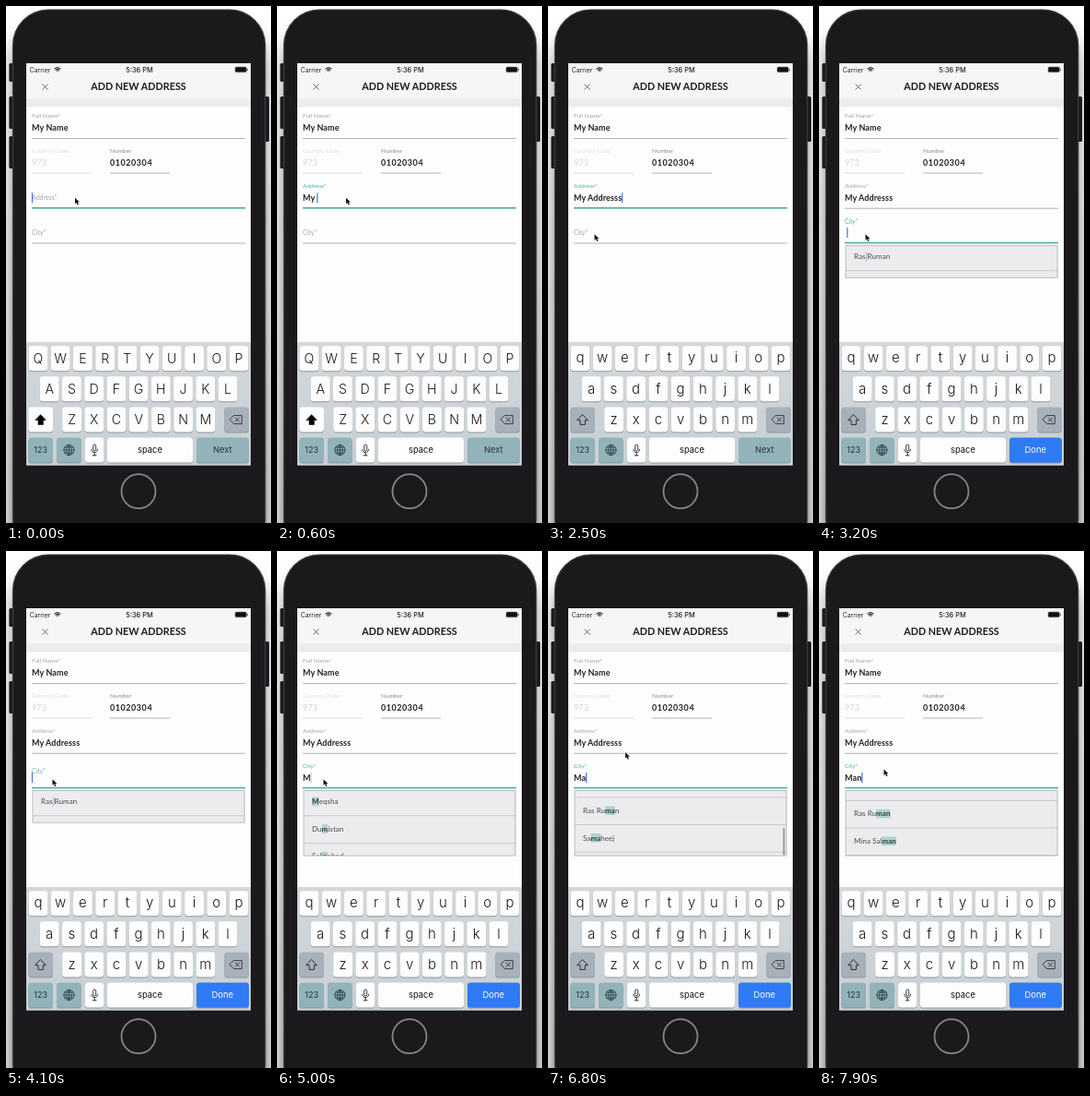
Animation, 288 px wide and 560 px high, one loop 8 s. Source, as an HTML page:

```html
<!DOCTYPE html>
<html lang="en">
<head>
<meta charset="utf-8">
<title>Add new address</title>
<style>
html, body { margin: 0; width: 100%; height: 100%; overflow: hidden; background: #fff; }
svg { display: block; width: 100%; height: 100%; }
text { white-space: pre; font-family: Lato, sans-serif; }
.ui { font-family: Inter, sans-serif; text-anchor: middle; }
</style>
</head>
<body>
<svg id="stage" viewBox="0 0 288 560">
  <defs>
    <filter id="soft" x="-20%" y="-10%" width="140%" height="120%"><feGaussianBlur stdDeviation="10"/></filter>
    <linearGradient id="shade" x1="0" y1="0" x2="0" y2="1">
      <stop offset="0" stop-opacity=".36"/><stop offset="1" stop-opacity=".68"/>
    </linearGradient>
    <linearGradient id="board" x1="0" y1="0" x2="0" y2="1">
      <stop offset="0" stop-color="#d3d7da"/><stop offset="1" stop-color="#c8d0d5"/>
    </linearGradient>
    <clipPath id="view"><rect id="viewBox" x="29" y="259" width="231" height="71"/></clipPath>
  </defs>
</svg>
<script>
const NS = 'http://www.w3.org/2000/svg';
const LOOP = 8000, ROW = 29.6, TOP = 259, MAX_H = 71;
const TEAL = [80, 176, 165], GREY = [165, 165, 165];
const stage = document.getElementById('stage');

function el(tag, attrs, parent = stage) {
  const node = document.createElementNS(NS, tag);
  set(node, attrs);
  parent.appendChild(node);
  return node;
}
function set(node, attrs) {
  for (const k in attrs) node.setAttribute(k, attrs[k]);
}
const rect = (x, y, width, height, fill, rx = 0, parent = stage) =>
  el('rect', { x, y, width, height, fill, rx }, parent);
const path = (d, attrs, parent = stage) =>
  el('path', { d, fill: 'none', 'stroke-linecap': 'round', 'stroke-linejoin': 'round', ...attrs }, parent);
function text(str, x, y, size, fill, attrs = {}, parent = stage) {
  const node = el('text', { x, y, 'font-size': size, fill, ...attrs }, parent);
  node.textContent = str;
  return node;
}
const group = (parent = stage, attrs = {}) => el('g', attrs, parent);
const show = (node, on) => node.setAttribute('display', on ? 'inline' : 'none');
const mix = (a, b, p) => `rgb(${a.map((v, i) => Math.round(v + (b[i] - v) * p))})`;

// Piecewise linear value; keys are [time, value]
function track(t, keys) {
  if (t <= keys[0][0]) return keys[0][1];
  for (let i = 1; i < keys.length; i++) {
    const [t1, v1] = keys[i], [t0, v0] = keys[i - 1];
    if (t < t1) return v0 + (v1 - v0) * (t - t0) / (t1 - t0);
  }
  return keys[keys.length - 1][1];
}
// Latest value of [time, value] steps
function step(t, keys) {
  let value = keys[0][1];
  for (const [at, v] of keys) if (t >= at) value = v;
  return value;
}

function drawPhone() {
  el('rect', { x: 6, y: 24, width: 277, height: 600, rx: 39, fill: 'url(#shade)', filter: 'url(#soft)' });
  [[3.4, 62, 20], [3.4, 98, 35], [3.4, 141, 35], [281, 98, 49]].forEach(([x, y, h]) => rect(x, y, 5, h, '#1b191c', 1.5));
  rect(6.9, 3.5, 275.4, 590, '#3c3a3e', 39);
  rect(8.2, 4.8, 272.8, 590, '#1b191c', 37.7);
  el('circle', { cx: 144, cy: 525.7, r: 18.5, fill: 'none', stroke: '#858488', 'stroke-width': 1.8 });
  rect(22, 62, 244, 435.4, '#fdfdfe');
}

function drawHeader() {
  rect(22, 62, 244, 39, '#f6f6f7');
  rect(22, 100.5, 244, 9, '#ececee');
  text('Carrier', 37, 71.6, 6.9, '#222', { class: 'ui' });
  for (const r of [1.5, 3, 4.5]) {
    const k = r * .72;
    path(`M${56 - k} ${71.2 - k}A${r} ${r} 0 0 1 ${56 + k} ${71.2 - k}`, { stroke: '#111', 'stroke-width': 1 });
  }
  text('5:36 PM', 145, 71.6, 7.4, '#222', { class: 'ui', 'font-weight': 500 });
  set(rect(249, 66, 12.4, 5.8, '#111', 1.4), { stroke: '#8a8a8c', 'stroke-width': .6 });
  rect(262, 67.8, 1, 2.2, '#555', .5);
  path('M39.9 84.9l5.4 5.4m0-5.4l-5.4 5.4', { stroke: '#444', 'stroke-width': .8 });
  text('ADD NEW ADDRESS', 144, 91.1, 10.8, '#1c1c1e', { 'font-weight': 700, 'text-anchor': 'middle' });
}

const value = (str, x, y, fill = '#222', extra = {}) =>
  text(str, x, y, 9, fill, { 'font-weight': 700, 'letter-spacing': .1, ...extra });

function drawForm() {
  text('Full Name*', 28, 121, 6.5, '#a2a2a2');
  value('My Name', 28, 135.4);
  rect(28, 143, 232, 1, '#b4b4b6');
  text('Country Code', 28, 158.6, 6.5, '#dedee0');
  value('973', 28, 173.4, '#d6d6d8', { 'font-weight': 400 });
  rect(28, 180.5, 65, 1, '#dcdcde');
  text('Number', 113, 158.6, 6.5, '#8a8a8a');
  value('01020304', 113, 173.4, '#222', { 'letter-spacing': .55 });
  rect(113, 180.5, 65, 1, '#b4b4b6');
}

function makeField(label, y) {
  const name = text(label, 28, y + 2.3, 7, '#aaa');
  const line = rect(28, y + 11, 232, 1, '#b4b4b6');
  const input = value('', 28, y + 3.4);
  return function (typed, lift, active) {
    set(name, {
      y: y + 2.3 - 13.2 * lift,
      'font-size': 7 - .5 * lift,
      fill: mix(GREY, TEAL, active ? lift : 0)
    });
    set(line, active
      ? { y: y + 10.2, height: 1.7, fill: mix(TEAL, TEAL, 0) }
      : { y: y + 11, height: 1, fill: '#b4b4b6' });
    if (input.textContent !== typed) input.textContent = typed;
    return 28.5 + (typed ? input.getComputedTextLength() : 0);
  };
}

const LISTS = {
  ' ': ['Ras Ruman', 'Mina Salman'],
  m: ['Meqsha', 'Dumistan', 'Salmabad', 'Samaheej', 'Manama'],
  ma: ['Manama', 'Salmabad', 'Salmaniya', 'Ras Ruman', 'Samaheej'],
  man: ['Manama', 'Salmaniya', 'Ras Ruman', 'Mina Salman']
};

function makeRows(query, parent) {
  const g = group(parent);
  LISTS[query].forEach((name, i) => {
    const mid = 271.6 + i * ROW;
    const at = name.toLowerCase().indexOf(query), end = at + query.length;
    const mark = rect(0, mid - 5, 0, 9.6, '#aed2d0', 0, g);
    const label = text('', 38, mid + 2.6, 8, '#4a4a4c', { 'letter-spacing': .06 }, g);
    [name.slice(0, at), name.slice(at, end), name.slice(end)].forEach((part, j) => {
      if (!part) return;
      const span = el('tspan', j === 1 ? { 'font-weight': 700, fill: '#2f3d3f' } : {}, label);
      span.textContent = part;
    });
    set(mark, {
      x: 38 + (at ? label.getSubStringLength(0, at) : 0),
      width: label.getSubStringLength(at, query.length)
    });
    rect(29, mid + 14.7, 231, .9, '#c6c6c8', 0, g);
  });
  return g;
}

function makeList() {
  const g = group();
  const inner = group(g, { 'clip-path': 'url(#view)' });
  rect(29, TOP, 231, MAX_H, '#ececee', 0, inner);
  const scroller = group(inner);
  const rows = {};
  for (const q in LISTS) rows[q] = makeRows(q, scroller);
  const bar = rect(255.6, 0, 1.6, 34, '#8b8b8d', .8, inner);
  const frame = el('rect', { x: 29, y: TOP + .5, width: 230, fill: 'none', stroke: '#b9b9bc', 'stroke-width': .9 }, g);
  const clip = document.getElementById('viewBox');
  return function (query, height, scroll, barAlpha) {
    show(g, height > .5);
    if (height <= .5) return;
    clip.setAttribute('height', height);
    frame.setAttribute('height', Math.max(0, height - .5));
    for (const q in rows) show(rows[q], q === query);
    scroller.setAttribute('transform', `translate(0 ${-scroll})`);
    const over = Math.max(0, scroll - 75);
    set(bar, { y: 261 + Math.min(scroll, 75) * .465 + over, height: 34 - over, opacity: barAlpha });
  };
}

function key(x, y, w, fill = '#fdfdfe', parent = stage) {
  rect(x, y + 1, w, 27, '#8f959a', 3.4, parent);
  rect(x, y, w, 27, fill, 3.4, parent);
}

function makeKeyboard() {
  const SOFT = '#a8b1ba', TINT = '#92b3b9', PITCH = 24.22;
  rect(22, 364, 244, 133.4, 'url(#board)');
  const upper = group(), lower = group();
  [['QWERTYUIOP', 35], ['ASDFGHJKL', 47.2], ['ZXCVBNM', 71.6]].forEach(([chars, start], r) => {
    const y = 368.2 + r * 33.1;
    [...chars].forEach((c, i) => {
      const x = start + i * PITCH;
      key(x - 10.4, y, 20.8);
      const style = { class: 'ui', 'font-weight': 300 };
      text(c, x, y + 18.8, 14.2, '#1a1a1a', style, upper);
      text(c.toLowerCase(), x, y + 18.2, 15, '#1a1a1a', style, lower);
    });
  });
  stage.append(upper, lower);

  const arrow = 'M37.7 442.8l5.6 5.8h-2.9v4.8h-5.4v-4.8h-2.9z';
  key(24.3, 434.4, 26.7, '#fdfdfe', upper);
  path(arrow, { fill: '#000', stroke: '#000', 'stroke-width': .6 }, upper);
  key(24.3, 434.4, 26.7, SOFT, lower);
  path(arrow, { stroke: '#222', 'stroke-width': .9 }, lower);

  key(237.3, 434.4, 26.7, SOFT);
  path('M247.7 443.6h8.6v9h-8.6l-4.4-4.5zM249.3 446l4.2 4.2m0-4.2l-4.2 4.2', { stroke: '#333', 'stroke-width': .9 });

  const small = { class: 'ui' };
  key(24.3, 467.6, 26.7, TINT);
  text('123', 37.6, 484.3, 9, '#24363a', small);
  key(55, 467.6, 26.7, TINT);
  path('M62.8 481a5.6 5.6 0 1 0 11.2 0a5.6 5.6 0 1 0-11.2 0h11.2M68.4 475.4v11.2M68.4 475.4c-3.8 3-3.8 8.2 0 11.2c3.8-3 3.8-8.2 0-11.2M64 478h8.8M64 484h8.8',
    { stroke: '#20383c', 'stroke-width': .8 });
  key(86, 467.6, 20.3);
  set(rect(94.7, 475, 3, 7, '#fff', 1.5), { stroke: '#222', 'stroke-width': .9 });
  path('M92.8 480.2c0 4.8 6.8 4.8 6.8 0M96.2 483.8v3M94.3 486.8h3.8', { stroke: '#222', 'stroke-width': .9 });
  key(110, 467.6, 93);
  text('space', 156.5, 483.8, 9.4, '#111', small);
  const next = group(), done = group();
  key(207, 467.6, 57, TINT, next);
  text('Next', 235.3, 484.2, 9.4, '#24363a', small, next);
  key(207, 467.6, 57, '#2f7bf5', done);
  text('Done', 235.3, 484.2, 9.4, '#fff', small, done);
  return function (caps, finish) {
    show(upper, caps);
    show(lower, !caps);
    show(next, !finish);
    show(done, finish);
  };
}

drawPhone();
drawHeader();
drawForm();
const address = makeField('Address*', 207.7);
const city = makeField('City*', 245.5);
const list = makeList();
const keyboard = makeKeyboard();
const caret = rect(0, 0, 1.2, 11, '#4a74dc');
const pointer = path('M0 0v7.6l1.8-1.6l1.3 3l1.5-.7l-1.3-2.8h2.4z',
  { fill: '#111', stroke: '#fff', 'stroke-width': .6, 'paint-order': 'stroke' });

const KEYS = [100, 300, 500, 900, 1100, 1300, 1600, 1700, 1800, 2000, 2200];
const CITY = [[0, ''], [3000, ' '], [4000, ''], [4400, 'M'], [5100, 'Ma'], [7400, 'Man']];
const QUERY = [[0, ' '], [4300, 'm'], [5200, 'ma'], [7400, 'man']];
const CAPS = [[0, true], [200, false], [600, true], [1000, false]];
const LIFT_A = [[50, 0], [300, 1]];
const LIFT_C = [[3000, 0], [3100, .4], [3200, .86], [3300, 1], [4000, 1], [4200, 0], [4400, 0], [4650, 1]];
const HEIGHT = [[3100, 0], [3200, 35], [3300, MAX_H], [4000, MAX_H], [4200, 0], [4450, 0], [4700, MAX_H]];
const SCROLL = [[5900, 0], [6100, 24], [6300, 52.3], [6400, 57], [6500, 65], [6650, 75], [6800, 79], [6950, 78], [7100, 76.3], [7300, 75.6]];
const BAR = [[5850, 0], [5950, 1], [7050, 1], [7300, 0]];
const BLINK = [[3600, 1], [3800, 0], [3990, 0], [4000, 1], [4600, 1], [4700, .35], [5000, .35], [5100, 1],
  [7500, 1], [7600, 0], [7800, 0], [7900, 1]];
const MOUSE_X = [[2100, 75], [2500, 50.5], [5550, 50.5], [5850, 78], [6300, 82], [6400, 84], [6850, 84], [7300, 70.5]];
const MOUSE_Y = [[2100, 207.8], [2500, 247.2], [5550, 247.2], [5850, 275], [5900, 275], [6300, 222.9], [6400, 218], [6850, 218], [7300, 236.4]];

function draw(t) {
  const inCity = t >= 2700;
  const typed = 'My Addresss'.slice(0, KEYS.filter(k => t >= k).length);
  const endA = address(typed, track(t, LIFT_A), !inCity);
  const endC = city(step(t, CITY), track(t, LIFT_C), inCity);
  const query = step(t, QUERY);
  const scroll = track(t, SCROLL) - (query === 'man' ? ROW : 0);
  list(query, track(t, HEIGHT), scroll, track(t, BAR));
  keyboard(step(t, CAPS), inCity);
  set(caret, { x: (inCity ? endC : endA) - .6, y: inCity ? 240 : 202.3, opacity: track(t, BLINK) });
  pointer.setAttribute('transform', `translate(${track(t, MOUSE_X)} ${track(t, MOUSE_Y)}) scale(.86)`);
}

const start = performance.now();
function tick() {
  draw((performance.now() - start) % LOOP);
  requestAnimationFrame(tick);
}
tick();
</script>
</body>
</html>
```
